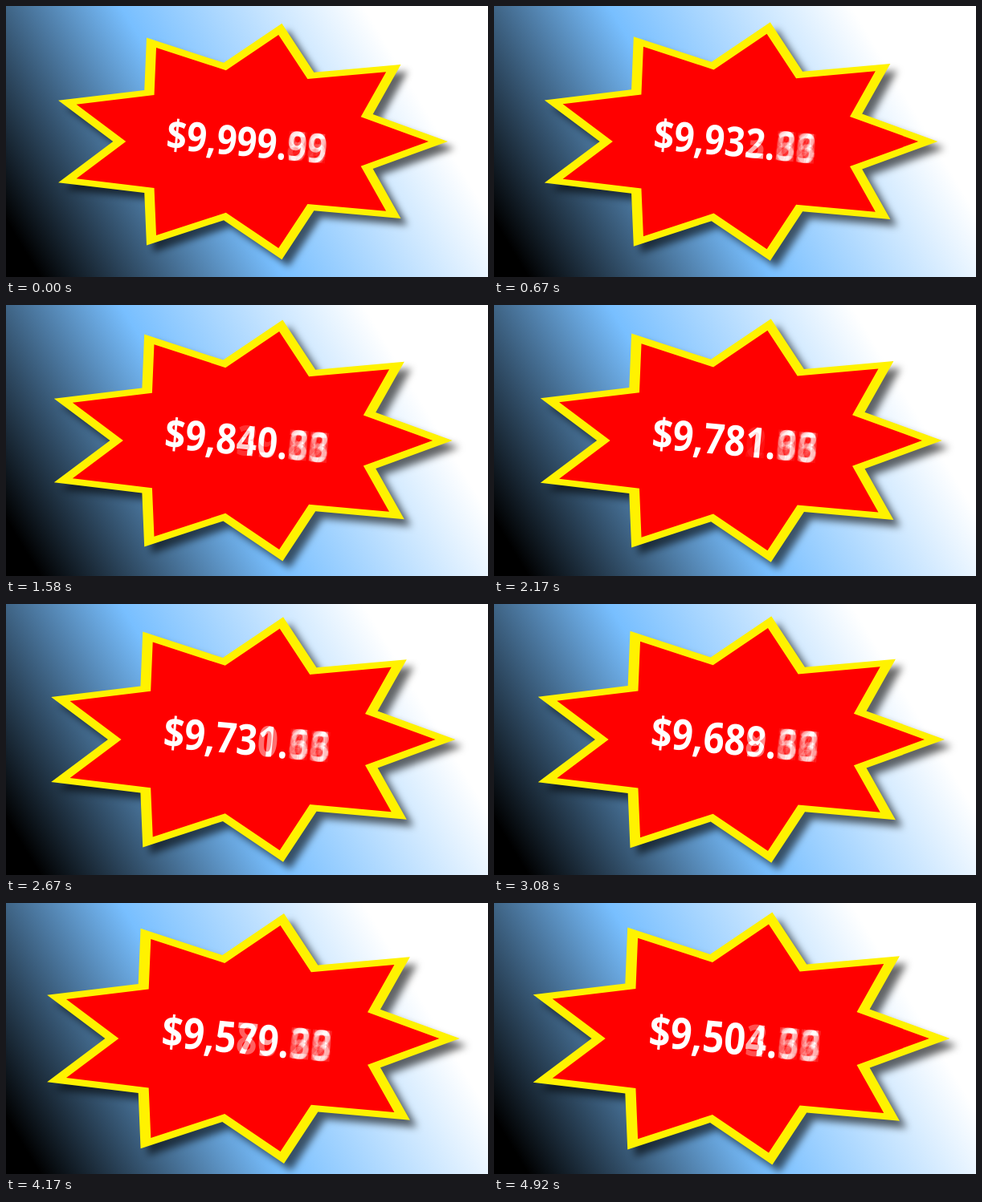
Write an HTML page that moves like this. It is 600x338 px and loops after 5010 ms.

```html
<!DOCTYPE html>
<html lang="en">
<head>
<meta charset="utf-8">
<title>Price countdown</title>
<style>
  html, body { margin: 0; width: 100%; height: 100%; overflow: hidden; background: #000; }
  svg { display: block; width: 100vw; height: 100vh; }
  #price { isolation: isolate; }
  text {
    font: bold 51px "Open Sans", "Noto Sans", sans-serif;
    text-anchor: middle;
    fill: #fff;
  }
  .digit { mix-blend-mode: plus-lighter; }
</style>
</head>
<body>
<svg viewBox="0 0 600 338" preserveAspectRatio="none">
  <defs>
    <linearGradient id="sky" gradientUnits="userSpaceOnUse" x1="-117.6" y1="70.6" x2="327.2" y2="-196.3">
      <stop offset="0" stop-color="#000"/>
      <stop offset=".5" stop-color="#78bfff"/>
      <stop offset="1" stop-color="#fff"/>
    </linearGradient>
    <filter id="blur" x="-20%" y="-20%" width="140%" height="140%">
      <feGaussianBlur stdDeviation="4.5"/>
    </filter>
  </defs>
  <rect width="600" height="338" fill="url(#sky)"/>
  <g id="badge">
    <polygon id="shadow" transform="translate(8.5 8.5)" fill="#000" fill-opacity=".6" filter="url(#blur)"/>
    <polygon id="rim" fill="#fff200"/>
    <polygon id="face" fill="#f00"/>
    <g id="price" transform="rotate(5.3) scale(.86 1)"></g>
  </g>
</svg>
<script>
const NS = "http://www.w3.org/2000/svg";
const LOOP = 5010, FPS = 12, FRAMES = 60;
const START = 9999.99, DROP = 500 / 59.5;   // dollars lost per frame
const BLUR = 0.58, SAMPLES = 16;            // blur half-width in dollars
const DIGIT = 29.15, MARK = 14.55;          // advance widths
const $ = id => document.getElementById(id);

function star(rx, ry, notch) {
  return Array.from({ length: 18 }, (_, k) => {
    const a = k * Math.PI / 9, r = k % 2 ? notch : 1;
    return (rx * r * Math.cos(a)).toFixed(2) + "," + (ry * r * Math.sin(a)).toFixed(2);
  }).join(" ");
}

function addText(x, str, cls) {
  const el = document.createElementNS(NS, "text");
  el.setAttribute("x", x);
  el.setAttribute("y", 18.3);
  if (cls) el.setAttribute("class", cls);
  el.textContent = str;
  $("price").appendChild(el);
  return el;
}

const outline = star(250, 149.5, 0.667);
$("shadow").setAttribute("points", outline);
$("rim").setAttribute("points", outline);
$("face").setAttribute("points", star(250 * 0.904, 149.5 * 0.904, 0.667));

// One slot per character; each digit slot holds all ten digits.
const slots = [];
let pen = -(7 * DIGIT + 2 * MARK) / 2;
for (const ch of "$0,000.00") {
  const width = ch === "," || ch === "." ? MARK : DIGIT;
  const x = pen + width / 2;
  pen += width;
  if (ch === "0") slots.push(Array.from({ length: 10 }, (_, d) => addText(x, d, "digit")));
  else addText(x, ch);
}

function drawPrice(value) {
  const weights = slots.map(() => new Array(10).fill(0));
  for (let s = 0; s < SAMPLES; s++) {
    const shift = BLUR * (2 * (s + 0.5) / SAMPLES - 1);
    const cents = Math.round(Math.min(START, value - shift) * 100);
    String(cents).padStart(6, "0").split("").forEach((d, i) => weights[i][d] += 1 / SAMPLES);
  }
  slots.forEach((slot, i) => slot.forEach((el, d) => {
    const w = weights[i][d];
    el.setAttribute("fill-opacity", w);
    el.style.display = w ? "" : "none";
  }));
}

let shown = -1;
function render(now) {
  const frame = Math.min(FRAMES - 1, Math.floor((now % LOOP + 5) * FPS / 1000));
  if (frame !== shown) {
    shown = frame;
    const zoom = 1 + 0.07 * frame / (FRAMES - 1);
    $("badge").setAttribute("transform", `translate(300 169) scale(${zoom})`);
    drawPrice(START - DROP * frame);
  }
}

const begin = performance.now();
function tick() {
  render(performance.now() - begin);
  requestAnimationFrame(tick);
}
tick();
</script>
</body>
</html>
```
